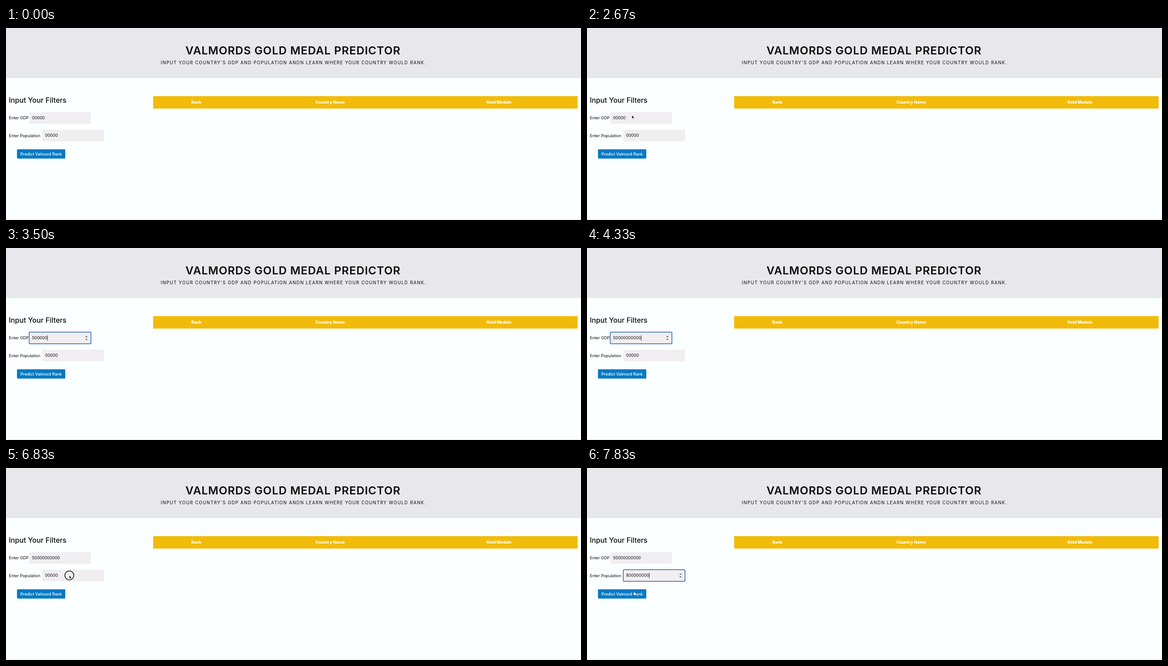
These frames come from a looping animation (1280 px wide and 429 px high, 8000 ms). An HTML page:

```html
<!DOCTYPE html>
<html lang="en">
<head>
<meta charset="utf-8">
<title>Gold Medal Predictor</title>
<style>
  html, body { margin: 0; width: 100%; height: 100%; overflow: hidden; background: #fcffff; }
  svg { display: block; width: 100%; height: 100%; }
  text { font-family: Inter, "Open Sans", sans-serif; font-size: 9px; fill: #0b0b0d; white-space: pre; }
  .mid { text-anchor: middle; }
  .title { font-size: 24.6px; font-weight: 600; letter-spacing: .9px; }
  .sub { font-size: 9.8px; letter-spacing: 1.24px; }
  .head { font-size: 15.8px; font-weight: 500; }
  .th { font-size: 9.1px; font-weight: 800; fill: #fff; }
  .btn { font-weight: 500; fill: #fff; }
  .box { fill: #f1eef1; }
  .ring { fill: none; stroke: #1f5fb4; stroke-width: 1.5; }
  .spin { fill: none; stroke: #333; stroke-width: 1.2; }
</style>
</head>
<body>
<svg viewBox="0 0 1280 429" preserveAspectRatio="none">
  <rect width="1280" height="429" fill="#fcffff"/>
  <rect width="1280" height="112" fill="#e8e8ec"/>
  <rect y="428" width="1280" height="1" fill="#dcdfe2"/>
  <text class="title mid" x="639" y="59">VALMORDS GOLD MEDAL PREDICTOR</text>
  <text class="sub mid" x="640" y="80.7">INPUT YOUR COUNTRY'S GDP AND POPULATION ANDN LEARN WHERE YOUR COUNTRY WOULD RANK.</text>
  <text class="head" x="6.3" y="166.5">Input Your Filters</text>
  <rect x="327.5" y="152.2" width="945" height="27.8" fill="#f2bb0a"/>
  <text class="th mid" x="423.7" y="168.5">Rank</text>
  <text class="th mid" x="721.5" y="168.5">Country Name</text>
  <text class="th mid" x="1097.3" y="168.5">Gold Medals</text>
  <text x="6.5" y="204">Enter GDP</text>
  <text x="6.5" y="243.5">Enter Population</text>
  <g id="fields"></g>
  <rect x="24.4" y="271" width="107.6" height="20.8" rx="2" fill="#047ac3"/>
  <text class="btn mid" x="78.2" y="284.7">Predict Valmord Rank</text>
  <g id="pointer">
    <circle id="click" r="10" fill="none" stroke="#111" stroke-width="1.5"/>
    <path id="arrow" d="M0 0V7.2L1.7 5.7L2.9 8.3L4.1 7.8L3 5.2H5.2Z" fill="#111" stroke="#fff" stroke-width=".5"/>
    <path id="beam" d="M-1.6 -3.7Q0 -3.7 0 -2.7Q0 -3.7 1.6 -3.7M0 -2.7V2.7M-1.6 3.7Q0 3.7 0 2.7Q0 3.7 1.6 3.7" fill="none" stroke="#222" stroke-width=".9"/>
    <path id="hand" d="M-1.5 -4.5Q-.5 -5.5 .2 -4L1 -2Q2.2 -2.7 2.8 -1.6Q4.6 -1.8 4.6 .4Q4.8 2.8 3.6 4H-.2Q-1.6 2.2 -3.2 .7Q-3 -.5 -1.2 .5L-1.8 -3.6Z" fill="#fff" stroke="#111" stroke-width=".8"/>
  </g>
</svg>
<script>
const LOOP = 8000;
const $ = id => document.getElementById(id);

// [start, typed text length, focused, caret shown]
const gdpSteps = [
  [0, 0, 0, 0], [3000, 0, 1, 1], [3170, 1, 1, 1], [3330, 3, 1, 1],
  [3500, 6, 1, 1], [3670, 9, 1, 1], [3830, 11, 1, 1], [4000, 11, 1, 0],
  [4330, 11, 1, 1], [5000, 11, 0, 0]
];
const popSteps = [
  [0, 0, 0, 0], [7000, 0, 1, 1], [7170, 1, 1, 1], [7330, 4, 1, 1],
  [7500, 7, 1, 1], [7670, 9, 1, 1]
];
// [start, shape, x, y, click ring]
const pointerSteps = [
  [0, ''], [2500, 'arrow', 112, 186, 0], [2670, 'arrow', 100, 195, 0],
  [2830, 'arrow', 100, 195, 1], [3000, 'beam', 100, 195, 0], [3170, ''],
  [6500, 'arrow', 128, 205, 0], [6670, 'arrow', 141, 240, 0],
  [6830, 'arrow', 141, 240, 1], [7000, 'beam', 141, 240, 0], [7170, ''],
  [7830, 'hand', 105, 280.5, 0]
];

const at = (steps, t) => steps.findLast(s => s[0] <= t);
const show = (el, on) => { el.style.display = on ? '' : 'none'; };

function makeField(x, y, value, steps) {
  const g = document.createElementNS('http://www.w3.org/2000/svg', 'g');
  g.setAttribute('transform', `translate(${x} ${y})`);
  g.innerHTML = `
    <rect class="box" width="137.5" height="26" rx="2"/>
    <g><rect class="ring" width="137.5" height="26" rx="2"/>
    <path class="spin" d="M125.6 11L127.4 9.2L129.2 11M125.6 15.2L127.4 17L129.2 15.2"/></g>
    <text x="6.3" y="16"></text>
    <rect y="7.2" width=".9" height="12" fill="#111"/>`;
  $('fields').append(g);
  const [, focus, text, caret] = g.children;
  return t => {
    const [, count, focused, caretOn] = at(steps, t);
    text.textContent = count ? value.slice(0, count) : '00000';
    text.style.fill = focused && !count ? '#c4c2c6' : '';
    show(focus, focused);
    show(caret, caretOn);
    if (caretOn) caret.setAttribute('x', 6.6 + (count ? text.getComputedTextLength() : 0));
  };
}

const fields = [
  makeField(51.6, 188, '50000000000', gdpSteps),
  makeField(80.7, 227.2, '800000000', popSteps)
];

function drawPointer(t) {
  const [, shape, x, y, ring] = at(pointerSteps, t);
  show($('pointer'), shape);
  if (!shape) return;
  $('pointer').setAttribute('transform', `translate(${x} ${y})`);
  for (const id of ['arrow', 'beam', 'hand']) show($(id), id === shape);
  show($('click'), ring);
}

const start = performance.now();
function frame() {
  const t = (performance.now() - start) % LOOP;
  fields.forEach(draw => draw(t));
  drawPointer(t);
  requestAnimationFrame(frame);
}
frame();
</script>
</body>
</html>
```
